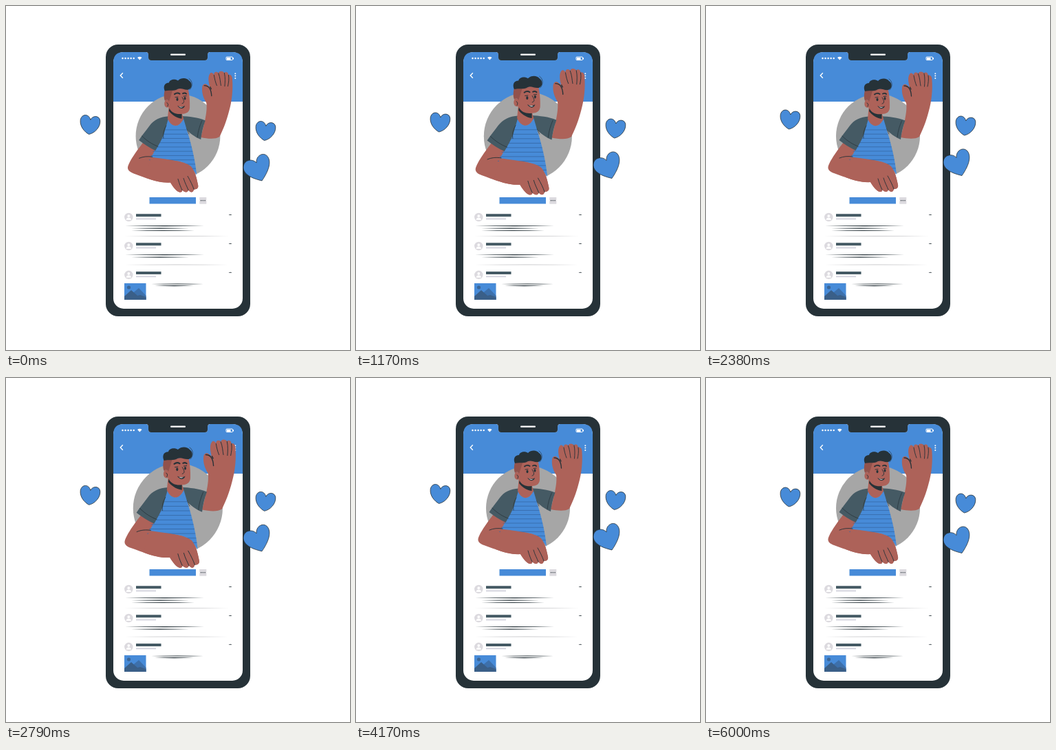
An HTML page that plays this animation: 500x500 px, repeating every 6.04 s.

```html
<!DOCTYPE html>
<html lang="en">
<head>
<meta charset="utf-8">
<title>Profile wave</title>
<style>
  html, body { margin: 0; width: 100%; height: 100%; overflow: hidden; background: #fff; }
  svg { display: block; width: 100vw; height: 100vh; }
  .blue { fill: #478bd8; }
  .dark { fill: #263238; }
  .slate { fill: #455a64; }
  .skin { fill: #ad6259; }
  .pale { fill: #dcdadf; }
  .white { fill: #fff; }
  .ink { fill: none; stroke: #263238; stroke-linecap: round; stroke-linejoin: round; }
  .heart { fill: #478bd8; stroke: #263238; stroke-width: .8; }
</style>
</head>
<body>
<svg viewBox="0 0 500 500">
  <defs>
    <clipPath id="shirtClip">
      <path d="M235 163C239 174 250 180 258 164L263 181C270 203 275 225 277 245L262 243L208 224L218 201Z"/>
    </clipPath>
    <path id="smallHeart" d="M12.5 28.5C6 25 -1 17 .2 7.5C2 -1.5 12.5 -2 14.8 7.5C18 .5 28.200 1 28.800 9C29.300 18 21 27 12.500 28.500Z"/>
  </defs>

  <g id="phone">
    <rect class="dark" x="145" y="56" width="210" height="395" rx="18"/>
    <rect class="white" x="156" y="67" width="188" height="373" rx="15"/>
    <path class="blue" d="M156 139V82Q156 67 171 67H203Q207 67 207 71V75Q207 79 211 79H289Q293 79 293 75V71Q293 67 297 67H329Q344 67 344 82V139Z"/>
    <path class="dark" d="M203 66.500Q207 67 207 71V75Q207 79 211 79H289Q293 79 293 75V71Q293 67 297 66.500Z"/>
    <rect class="white" x="239" y="69.500" width="22" height="2.200" rx="1"/>
    <path d="M169.500 76H186" fill="none" stroke="#fff" stroke-width="2.400" stroke-linecap="round" stroke-dasharray="0 4.050"/>
    <path class="white" d="M191 75Q194.300 72.300 197.600 75L194.300 78.500Z"/>
    <rect x="320" y="74" width="9.500" height="4.600" rx="1" fill="none" stroke="#fff"/>
    <path class="white" d="M321 75H326.500V78H321ZM330 75.200H331V77.400H330Z"/>
    <path d="M169.800 97.300L166.300 101L169.800 104.700" fill="none" stroke="#fff" stroke-width="1.400"/>
    <path d="M333.300 98.300V106" fill="none" stroke="#fff" stroke-width="2" stroke-linecap="round" stroke-dasharray="0 3.300"/>
    <rect class="blue" x="208.500" y="278" width="67.500" height="9.500"/>
    <rect class="pale" x="281.300" y="278" width="10" height="9.700"/>
    <path class="ink" d="M283.600 282.700H289.500" stroke-width="1.500" stroke-dasharray="0 2.700"/>
    <g id="feed"></g>
    <rect class="blue" x="172" y="403" width="31.500" height="24"/>
    <circle cx="178.500" cy="409" r="2.600" fill="#3a6698"/>
    <path d="M181 420L193 410L203.500 421V427H181Z" fill="#3d70ab"/>
    <path d="M172 422L182 413L191 421L195 420L203.500 423V427H172Z" fill="#3a5f88"/>
  </g>

  <g id="person">
    <circle cx="250" cy="189" r="61" fill="#a6a6a6"/>
    <path class="skin" d="M283 191L289 166C291 156 292 148 291 141C287 135 284 127 285 118C286 113 290 113 292 115L296 118C294 111 293 103 296 99C298 96 301 98 302 101C301 96 307 95 308.500 98.500C309 94.500 315 94.500 317 98C319 95 323 97 323 101C325 99 329 102 328.500 108C329.500 122 328 138 324 152C320 168 315 180 310 190C304 194 293 193 283 191Z"/>
    <path class="ink" stroke-width="1.300" d="M288 116C295 116 298 122 298.500 131M296.500 118L298 121"/>
    <path class="ink" stroke-width=".9" d="M302 101C303 107 304 111 306 116M308.500 98.500C311 105 311 111 312 116M317 98C318.500 105 318 111 317.500 117M323 101C324 107 323 112 322 117"/>
    <path class="slate" d="M254 160C266 161 279 162 289.500 166.500C286 176 284 185 283 194C274 190 267 185 261 178Z"/>
    <path class="ink" stroke-width=".7" d="M284.500 167C281 175 279 182 278 191M262 178L266 186"/>

    <path class="skin" d="M203 194C193 207 180 224 177.500 234C177 238 180 241 186 243C203 249 221 257 239 256C243 263 249 271 254 270C256 270 256 268 256 267C260 271 264 271 265 267C268 271 272 271 273 266C276 266 280 265 279 260C277 250 275 241 269 233C261 226 246 224 215 220L225 205Z"/>
    <path class="blue" d="M235 163C239 174 250 180 258 164L263 181C270 203 275 225 277 245C270 235 263 227 250 225.500C235 223 222 222 211 220C215 213 220 205 222 197Z"/>
    <g id="stripes" clip-path="url(#shirtClip)" stroke="#3568a5" stroke-width=".8"></g>
    <path class="skin" d="M269 233C261 226 246 224 211 219.500L203 249C216 254 228 257 239 256C244 264 250 271 254 270C257 269 256 268 256 267C260 271 264 271 265 267C268 271 272 271 273 266C276 266 280 265 279 260C277 250 275 241 269 233Z"/>
    <path class="ink" stroke-width=".9" d="M194 221C200 218.500 206 218 213 219M250 251C252 258 254 263 256 267M258 250C260 257 263 262 265 267M264 247C268 254 271 260 273 266"/>
    <path class="slate" d="M237 160.500C224 161 215 166 209 174C204 181 198 188 193.500 195C201 201 209 206 217.500 210C222 202 227 194 230 185Z"/>
    <path class="ink" stroke-width=".7" d="M198 189C205 196 213 201 221 204M229 192C228 185 230 179 233 174"/>

    <path class="skin" d="M237 143L235 164C240 176 251 179 258 164L255 154Z"/>
    <path class="dark" d="M237.500 149C241 156 248 158 255.500 157L255.500 164C247 163 240 157 237 153Z"/>
    <path class="skin" d="M235 124L264 118C266 126 267.500 137 267 148C266.500 156 259 158 252 156.500C245 155 240 151 237.500 147C232 150 229 144 231 139C232 135 234 136 236 138Z"/>
    <path d="M231 122L243 120L240 130L237 139C234 135 232 137 231 138C229 132 230 127 231 122Z" fill="#92524c"/>
    <path class="dark" d="M231 124C228 117 231 112 237 112C238 107 246 106 250 109C255 104 263 105 266 109C271 112 271 120 265 122C259 123 255 119 250 121C244 125 237 122 231 124Z"/>
    <path class="ink" stroke-width=".6" d="M266 106C272 110 271 118 267 122"/>
    <path class="ink" stroke-width="1.900" d="M245 128.500Q249 125.500 252.500 128M257 127.500Q260 126 262 128"/>
    <ellipse class="dark" cx="249" cy="136" rx="1.500" ry="2.300"/>
    <ellipse class="dark" cx="260" cy="134.500" rx="1.400" ry="2.200"/>
    <path class="ink" stroke-width=".9" d="M256 133C259 138 260 141 256 142M234 141Q237 142 235 146M246 133L250 132.500M258 131.500L262 131"/>
    <path class="dark" d="M249 145C253 147 257 147 260 145C259 150 253 151 249 145Z"/>
    <path class="white" d="M251 146.200Q254 147.300 257.500 146.700Q255 149 251 146.200Z"/>
  </g>

  <g id="hearts" class="heart">
    <use href="#smallHeart" x="108" y="158.500"/>
    <use href="#smallHeart" x="363" y="167.500"/>
    <path d="M372 254.500C361 252 346 247 345 236C344.500 224 358 221.500 364 228.500C363 218 374 212 380 219C387 228 380 243 372 254.500Z"/>
  </g>
</svg>
<script>
const LOOP = 6040, STEPS = 150, PIVOT = [252.5, 183];
const el = id => document.getElementById(id);

// Hairline that thins out towards both ends
const taper = (x1, x2, y, color = '#263238') => {
  const mid = (x1 + x2) / 2;
  return `<path fill="${color}" d="M${x1} ${y}Q${mid} ${y - 1.1} ${x2} ${y}Q${mid} ${y + 1.1} ${x1} ${y}Z"/>`;
};

const post = y => `
  <circle class="pale" cx="178.300" cy="${y}" r="6.200"/>
  <circle class="white" cx="178.300" cy="${y - 1.8}" r="1.900"/>
  <path class="white" d="M174.500 ${y + 4}Q175 ${y + .6} 178.300 ${y + .6}T182 ${y + 4}Z"/>
  <rect class="slate" x="189" y="${y - 4.8}" width="36.500" height="4"/>
  <rect x="189" y="${y + 1.300}" width="29" height="2.200" fill="#d9d9e2"/>
  ${taper(323.5, 328.5, y - 3.5)}`;

el('feed').innerHTML = [307, 349, 390.8].map(post).join('') + [
  [173, 288, 319.6], [182, 266, 323.1], [182, 274, 326.5],
  [173, 288, 361.6], [182, 266, 365.1],
  [211, 287, 404], [216, 273, 406.6]
].map(line => taper(...line)).join('') +
  [334.5, 376].map(y => taper(172, 324, y, '#c9c9cc')).join('');

el('stripes').innerHTML = Array.from({ length: 10 }, (_, i) =>
  `<path d="M205 ${180 + i * 6.2}H280"/>`).join('');

// Two linear beats, then a long rest
const BEATS = [[0, 1], [.1, 1.1], [.3, 1], [.4, 1], [.5, 1.1], [.6, 1], [1, 1]];

function beatScale(p) {
  const i = BEATS.findIndex(([at], k) => k > 0 && p <= at);
  const [a, from] = BEATS[i - 1], [b, to] = BEATS[i];
  return from + (to - from) * (p - a) / (b - a);
}

function render(ms) {
  const p = (Math.floor(ms % LOOP / LOOP * STEPS + 1e-6) + 1) % STEPS / STEPS;
  const [x, y] = PIVOT;
  el('person').setAttribute('transform',
    `translate(${x} ${y}) scale(${beatScale(p)}) translate(${-x} ${-y})`);
  const lift = 10 * (1 - Math.abs(1 - 2 * (p * 4 % 1)));
  el('hearts').setAttribute('transform', `translate(0 ${-lift})`);
}

const start = performance.now();
function tick() {
  render(performance.now() - start);
  requestAnimationFrame(tick);
}
tick();
</script>
</body>
</html>
```
